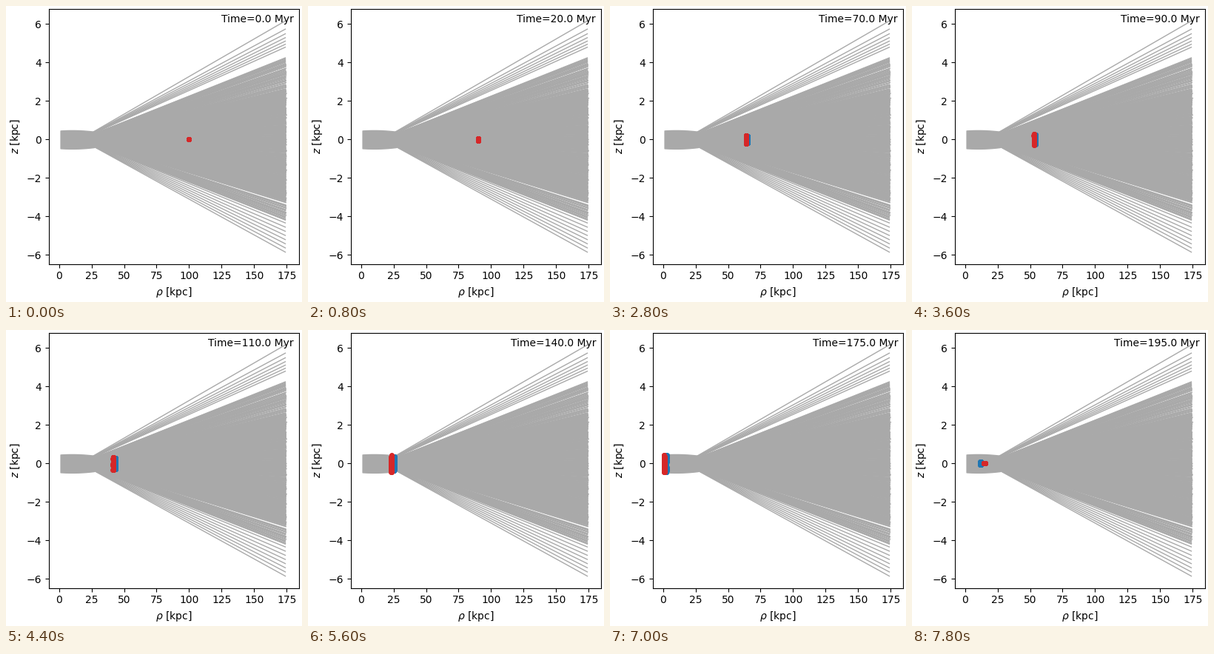
Animation, 400 px wide and 400 px high, one loop 8 s. Source, as a matplotlib script:

```python
import numpy as np
import matplotlib.pyplot as plt
from matplotlib.animation import FuncAnimation
from matplotlib.collections import LineCollection

FRAMES, STEP = 40, 5.0        # frames per loop, Myr per frame
GRAY, BLUE, RED = "darkgray", "tab:blue", "tab:red"
FOCUS = (16.5, 0.0)           # where outgoing paths cross the plane
rng = np.random.default_rng(4)


def band(low, high, count):
    """Evenly spaced heights, slightly shaken."""
    gap = (high - low) / count
    return np.linspace(low, high, count) + rng.normal(0, 0.6 * gap, count)


def fan_ends():
    """Heights at which the outgoing paths end."""
    return np.concatenate([
        6.17 - 1.37 * np.linspace(0, 1, 7) ** 0.65,
        np.linspace(-5.88, -4.36, 8),
        band(2.6, 4.25, 48),
        band(-3.2, 2.6, 320),
        band(-4.2, -3.2, 26),
    ])


def draw_paths(ax):
    z = fan_ends()
    x = 174.4 + 0.35 * np.abs(rng.normal(size=z.size)) * (np.abs(z) < 4)
    paths = [[FOCUS, end] for end in zip(x, z)]
    ax.add_collection(LineCollection(paths, colors=GRAY, linewidths=1))

    # bundle of paths close to the centre
    rho = np.linspace(1.1, 27, 60)
    half = 0.48 - 0.00025 * (rho - 10) ** 2
    ax.fill_between(rho, -half - 0.01, half - 0.01, color=GRAY, linewidth=1)


class Swarm:
    """Particles falling in, passing the centre and refocusing."""

    def __init__(self, ax, color, speed, pull, lag, scale, count=160):
        self.speed, self.pull, self.lag = speed, pull, lag
        self.w = scale * np.linspace(-1.04, 0.95, count)
        self.jitter = rng.normal(0, 0.08, count)
        self.dots, = ax.plot([], [], "o", ms=4, color=color)

    def move(self, t):
        s = 100 - self.speed * t - self.pull * t ** 3
        age = max(t - self.lag, 0)
        spread = min(0.0031 * age, 0.49, 0.022 * (195 - age))
        rho = np.hypot(s + self.jitter * t / 100, 1.0)
        self.dots.set_data(rho, self.w * spread)


fig, ax = plt.subplots(figsize=(4, 4), dpi=100, layout="constrained")
draw_paths(ax)
ax.autoscale_view()
ax.set(xlim=(-7.8, 184.5), xlabel=r"$\rho$ [kpc]", ylabel=r"$z$ [kpc]")
ax.set_xticks(range(0, 176, 25))
ax.set_yticks(range(-6, 7, 2))
ax.autoscale(False)
clock = ax.text(0.98, 0.98, "", transform=ax.transAxes, ha="right", va="top")

swarms = [
    Swarm(ax, BLUE, speed=0.489, pull=2.25e-6, lag=4, scale=0.9),
    Swarm(ax, RED, speed=0.503, pull=2.27e-6, lag=0, scale=1.0),
]


def update(i):
    t = i * STEP
    for swarm in swarms:
        swarm.move(t)
    clock.set_text(f"Time={t:.1f} Myr")
    return [clock] + [swarm.dots for swarm in swarms]


anim = FuncAnimation(fig, update, frames=FRAMES, interval=200,
                     repeat=True, repeat_delay=0)
plt.show()
```
